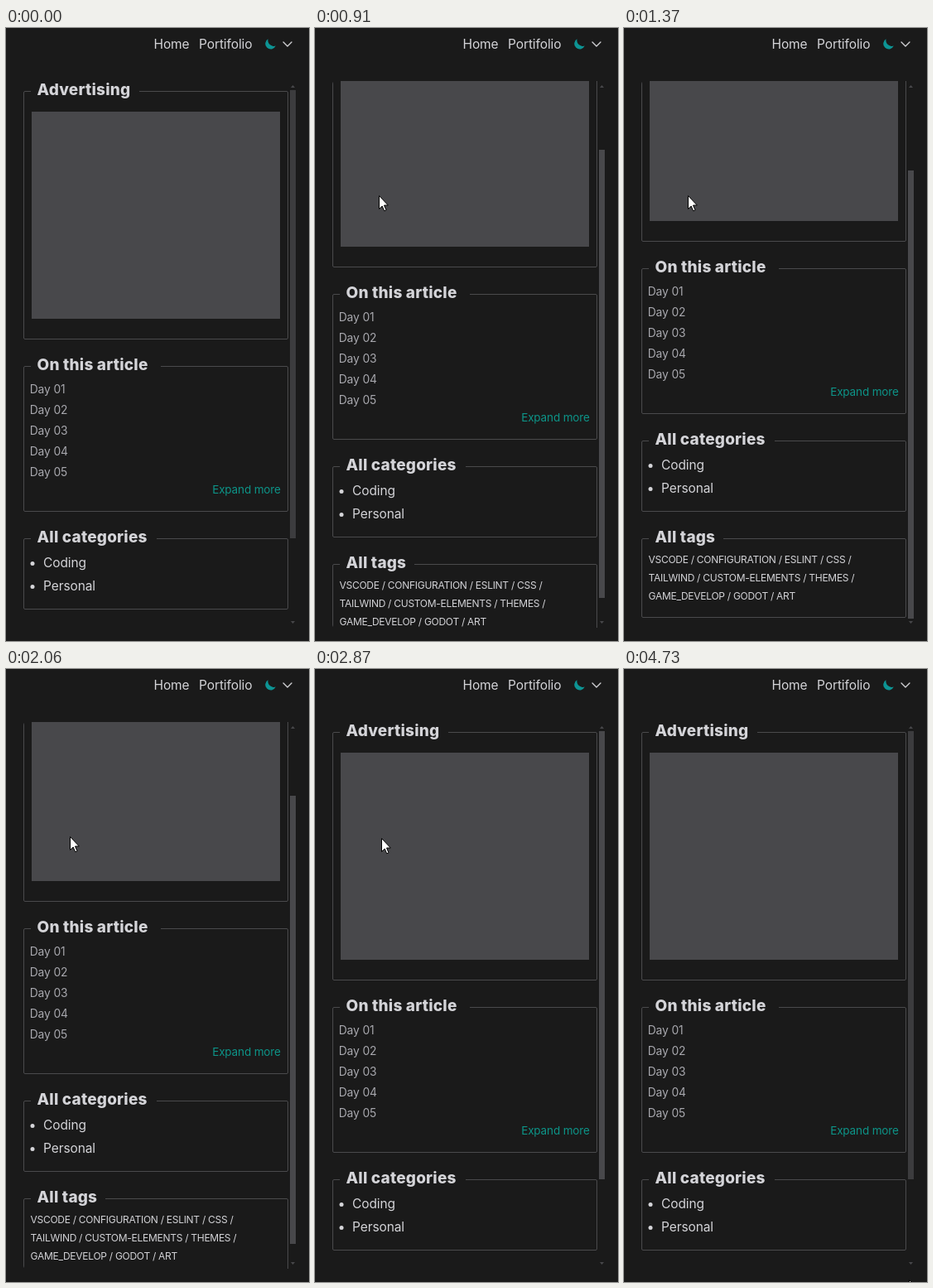
Animation, 366 px wide and 740 px high, one loop 5340 ms. Source, as an HTML page:

```html
<!DOCTYPE html>
<html lang="en">
<head>
<meta charset="utf-8">
<title>Sidebar scroll</title>
<style>
  html, body { margin: 0; width: 100%; height: 100%; overflow: hidden; background: #1a1a1a; }
  svg { display: block; width: 100%; height: 100%; }
  text { font: 15.5px Inter, sans-serif; letter-spacing: -.1px; fill: #d4d4d8; }
  .legend { font-size: 19px; font-weight: 800; letter-spacing: .2px; }
  .day { font-size: 13.8px; fill: #a8a8ae; }
  .more { font-size: 13.5px; letter-spacing: -.15px; fill: #0d9488; }
  .tag { font-size: 12px; letter-spacing: -.28px; }
  .frame { fill: none; stroke: #4a4a4c; }
  .arrow { fill: #48484b; }
</style>
</head>
<body>
<svg viewBox="0 0 366 740">
  <clipPath id="view"><rect x="21" y="64" width="329" height="660" rx="4"/></clipPath>
  <rect width="366" height="740" fill="#1a1a1a"/>

  <text x="178.5" y="25">Home</text>
  <text x="233" y="25">Portifolio</text>
  <path d="M316.5 13.2A6.6 6.6 0 1 0 325.8 21.6A7.3 7.3 0 0 1 316.5 13.2Z" fill="#0d9494"/>
  <path d="M335 17l5 5 5-5" fill="none" stroke="#d4d4d8" stroke-width="1.3" stroke-linecap="round" stroke-linejoin="round"/>

  <g clip-path="url(#view)">
    <g id="content">
      <rect x="31" y="101" width="300" height="250" fill="#48484b"/>
      <text class="more" x="249.2" y="562">Expand more</text>
    </g>
    <path class="arrow" d="M344 72l2.5-3 2.5 3z"/>
    <path class="arrow" d="M344 716l2.5 3 2.5-3z"/>
    <rect id="thumb" x="343" y="75" width="7" height="541"/>
  </g>

  <path id="cursor" d="M.5 .5V16.5L4.2 13 6.7 18.8 9 17.8 6.5 12H11.3Z" fill="#fff" stroke="#000" stroke-linejoin="round"/>
</svg>
<script>
const LOOP = 5340;
const content = document.getElementById('content');
const thumb = document.getElementById('thumb');
const cursor = document.getElementById('cursor');

function add(name, attrs, label = '') {
  const node = document.createElementNS('http://www.w3.org/2000/svg', name);
  for (const key in attrs) node.setAttribute(key, attrs[key]);
  node.textContent = label;
  content.append(node);
}

function addText(cls, x, y, label) {
  add('text', { class: cls, x, y }, label);
}

// Bordered group whose title interrupts the top edge
function addGroup(title, top, bottom, gapEnd) {
  const t = top + .5, b = bottom - .5;
  add('path', {
    class: 'frame',
    d: `M${gapEnd} ${t}H339Q340.5 ${t} 340.5 ${t + 1.5}V${b - 1.5}Q340.5 ${b} 339 ${b}` +
       `H23Q21.5 ${b} 21.5 ${b - 1.5}V${t + 1.5}Q21.5 ${t} 23 ${t}H30`
  });
  addText('legend', 37.5, top + 5, title);
}

addGroup('Advertising', 76, 376, 161);
addGroup('On this article', 408, 584, 187);
addGroup('All categories', 616, 702, 182);
addGroup('All tags', 734, 830, 120);

for (let i = 0; i < 5; i++) addText('day', 28.7, 441 + 25 * i, `Day 0${i + 1}`);

['Coding', 'Personal'].forEach((label, i) => {
  add('circle', { cx: 32, cy: 646.5 + 28 * i, r: 2.5, fill: '#d4d4d8' });
  addText('', 45, 651 + 28 * i, label);
});

[
  'VSCODE / CONFIGURATION / ESLINT / CSS /',
  'TAILWIND / CUSTOM-ELEMENTS / THEMES /',
  'GAME_DEVELOP / GODOT / ART'
].forEach((line, i) => addText('tag', 29.5, 764 + 22 * i, line));

// Each segment: start, end, number of discrete steps, waypoints
const moves = [
  [130, 600, 7, [[308, 682], [225, 545], [161, 390], [72, 203]]],
  [680, 680, 1, [[77, 202]]],
  [2870, 3370, 8, [[80, 204], [105, 200], [180, 186], [245, 168], [279, 162]]],
  [3440, 3790, 6, [[285, 165], [325, 195], [351, 226]]],
  [3990, 4470, 7, [[352, 227], [347, 500], [318, 640], [253, 556]]],
  [4540, 4730, 4, [[270, 585], [318, 675], [344, 737]]]
];
const scrolls = [
  [830, 990, 3, [[36], [87], [100]]],
  [1220, 1370, 3, [[105], [115], [118]]],
  [2060, 2470, 6, [[95], [41], [19], [14], [4], [0]]]
];

function sample(segments, t) {
  const segment = segments.filter(s => t >= s[0]).pop();
  if (!segment) return null;
  const [start, end, steps, points] = segment;
  const last = points.length - 1;
  if (t >= end || !last) return points[last];
  const step = Math.floor((t - start) / (end - start) * (steps - 1) + .01);
  const pos = step / (steps - 1) * last;
  const i = Math.min(Math.floor(pos + 1e-6), last - 1);
  return points[i].map((v, k) => Math.round(v + (points[i + 1][k] - v) * (pos - i)));
}

function draw(now) {
  const t = now % LOOP;
  const [scroll] = sample(scrolls, t) || [0];
  content.setAttribute('transform', `translate(0 ${-scroll})`);
  thumb.setAttribute('y', 75 + Math.round(scroll * 97 / 118));
  thumb.setAttribute('fill', t >= 830 && t < 4540 ? '#48484b' : '#3c3c3e');

  const tip = sample(moves, t);
  cursor.setAttribute('visibility', tip ? 'visible' : 'hidden');
  if (tip) cursor.setAttribute('transform', `translate(${tip[0]} ${tip[1]})`);
}

const origin = performance.now();
function tick() {
  draw(performance.now() - origin);
  requestAnimationFrame(tick);
}
tick();
</script>
</body>
</html>
```
